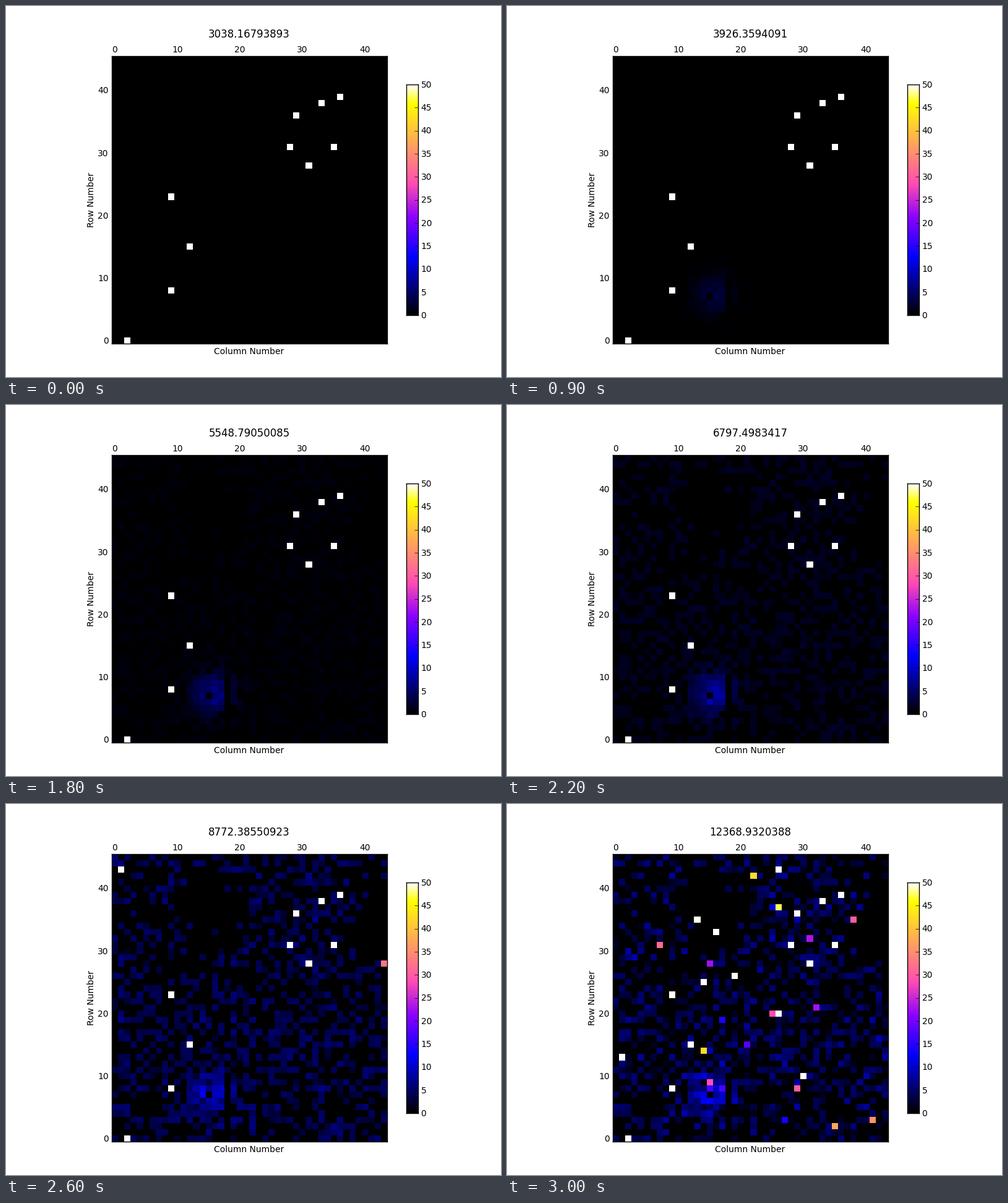
Animation of 800 by 600 pixels, one loop 3.1 s. Source, as a matplotlib script:

```python
import numpy as np
import matplotlib.pyplot as plt
from matplotlib.animation import FuncAnimation
from matplotlib.transforms import Affine2D

W, H, DPI = 800, 600, 100
COLS, ROWS = 44, 46
FRAMES, INTERVAL = 31, 100
VMAX = 50

plt.rcParams.update({"font.family": "DejaVu Sans", "font.size": 10,
                     "axes.linewidth": 1.0})

# Wavelength bins: edges evenly spaced in energy between 3000 and 13000
edges = 1 / np.linspace(1 / 3000, 1 / 13000, FRAMES + 1)
centres = (edges[:-1] + edges[1:]) / 2

# Pixels (column, row) that are always saturated
SATURATED = [(2, 0), (9, 8), (12, 15), (9, 23), (31, 28),
             (28, 31), (35, 31), (29, 36), (33, 38), (36, 39)]

# Brightness of sky and star at a few moments
KEYS = [0, 9, 13, 18, 24, 27, 30]
SKY = [0, .13, .36, .68, 2.2, 5.5, 4.3]
STAR = [0, 2.8, 4.4, 6.0, 6.0, 6.0, 6.5]

row, col = np.mgrid[:ROWS, :COLS]


def bump(c, r, wide, high):
    return np.exp(-((col - c) / wide) ** 2 / 2 - ((row - r) / high) ** 2 / 2)


# Live pixels: sparse at upper left and upper right, dense around the star
rng = np.random.default_rng(12)
share = (.4 - .42 * bump(14, 36, 5, 5) - .35 * bump(42, 34, 4, 7)
         + .15 * bump(30, 36, 4, 6) + .15 * bump(29, 18, 6, 4)
         + .9 * bump(14.5, 7, 2.5, 3))
alive = rng.random((ROWS, COLS)) < share
alive[:11, 18] = False
alive[7, 15] = False
gain = rng.uniform(.75, 1.05, (ROWS, COLS))
glow = bump(15.8, 7.5, 2.2, 2.2)


def add_hot_pixels(data, n, r):
    late = max(0, n - 24) / 6
    for _ in range(int(26 * late ** 2)):
        data[r.integers(ROWS), r.integers(COLS)] = 10 + 55 * r.random()


def counts(n):
    r = np.random.default_rng(100 + n)
    sky, star = np.interp(n, KEYS, SKY), np.interp(n, KEYS, STAR)
    noise = .12 + .3 * (n / (FRAMES - 1)) ** 8
    jitter = r.normal(1, noise, (ROWS, COLS))
    data = alive * jitter * (sky * gain + star * glow)
    add_hot_pixels(data, n, r)
    for c, k in SATURATED:
        data[k, c] = VMAX
    return np.clip(data, 0, VMAX)


def axes_at(x, y, w, h):
    return fig.add_axes([x / W, y / H, w / W, h / H])


def label(x, y, text, **style):
    return fig.text(x / W, y / H, text, ha="center", va="baseline", **style)


def nudge(labels, dx, dy):
    for text in labels:
        text.set_transform(text.get_transform() + Affine2D().translate(dx, dy))


fig = plt.figure(figsize=(W / DPI, H / DPI), dpi=DPI, facecolor="white")
width = 465 * COLS / ROWS
left = 616 - width
middle = left + width / 2 - .6

ax = axes_at(left, 54, width, 465)
image = ax.imshow(counts(0), cmap="gnuplot2", vmin=0, vmax=VMAX,
                  origin="lower", aspect="auto", interpolation="nearest")
ax.set_xticks(range(0, COLS, 10))
ax.set_yticks(range(0, ROWS, 10))
ax.tick_params(direction="in", length=4, width=.5, pad=4, top=True, right=True,
               labeltop=True, labelbottom=False)
plt.setp(ax.get_xticklabels(), va="baseline")
nudge(ax.get_xticklabels(), -.6, 0)
nudge(ax.get_yticklabels(), 0, .6)

bar = axes_at(647, 100, 18.6, 373)
bar.imshow(np.arange(256)[:, None], cmap="gnuplot2", origin="lower",
           aspect="auto", extent=(0, 1, 0, VMAX), interpolation="nearest")
bar.set_xticks([])
bar.set_yticks(range(0, VMAX + 1, 5))
bar.yaxis.tick_right()
bar.tick_params(direction="in", length=4, width=.5, pad=4)
nudge(bar.get_yticklabels(), -.6, .6)

title = label(middle, H - 50.8, "", fontsize=12)
label(middle, H - 563.3, "Column Number")
label(142, H - 313.5, "Row Number", rotation=90, rotation_mode="anchor")


def draw(n):
    image.set_data(counts(n))
    title.set_text(f"{centres[n]:.12g}")
    return image, title


anim = FuncAnimation(fig, draw, frames=FRAMES, interval=INTERVAL,
                     repeat=True, repeat_delay=0, blit=False)
plt.show()
```
